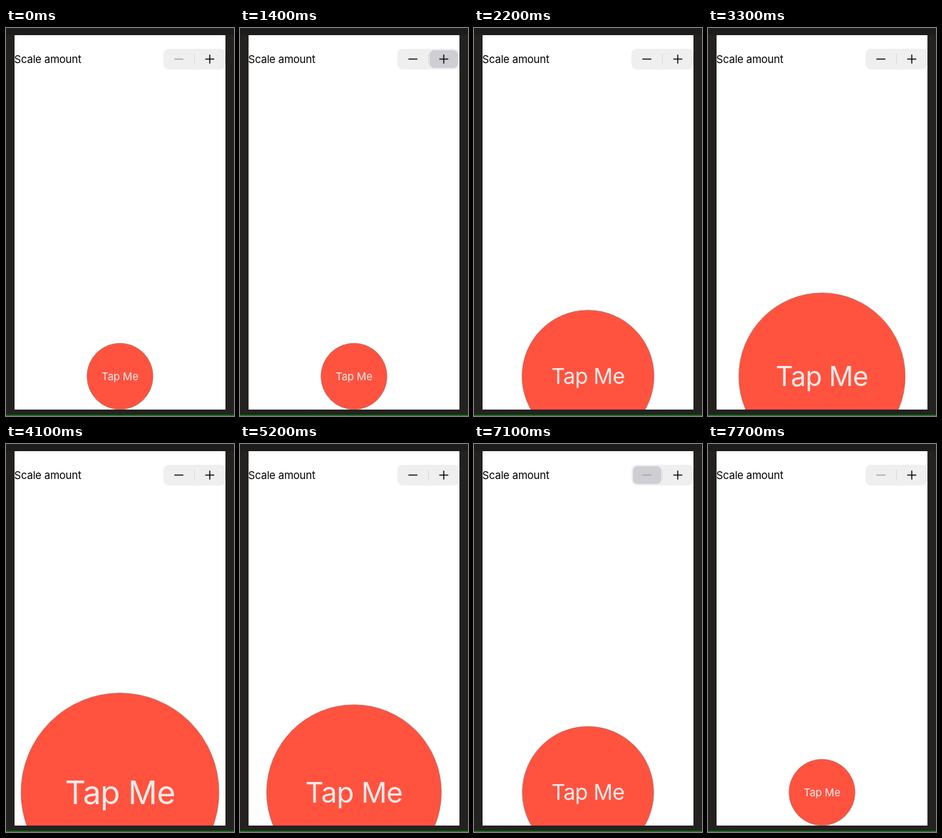
These frames come from a looping animation (320 by 543 pixels, 8 s). An HTML page:

```html
<!DOCTYPE html>
<html lang="en">
<head>
<meta charset="utf-8">
<title>Scale stepper</title>
<style>
  html, body { margin: 0; width: 100%; height: 100%; overflow: hidden; background: #242221; }
  svg { display: block; width: 100vw; height: 100vh; }
  text { font: 15px Inter, "Open Sans", sans-serif; letter-spacing: -0.2px; }
</style>
</head>
<body>
<svg viewBox="0 0 320 543">
  <clipPath id="screen"><rect x="12" y="10" width="296" height="524"/></clipPath>
  <rect width="320" height="543" fill="#242221"/>
  <rect width="320" height="10" fill="#1e1c1b"/>
  <rect y="541.5" width="320" height="1.5" fill="#187d1c"/>
  <g clip-path="url(#screen)">
    <rect x="12" y="10" width="296" height="524" fill="#fff"/>
    <text x="11.5" y="48.8">Scale amount</text>

    <rect x="221" y="29" width="87" height="29" rx="7.5" fill="#efeff0"/>
    <path d="M264.5 36V51" stroke="#dcdcde"/>
    <rect id="press" y="31" width="40" height="25" rx="6.5" fill="#cfced4"/>
    <path id="minus" d="M236.3 43.5h12.6" stroke-width="1.5"/>
    <path d="M279.7 43.5h12.6M286 37.2v12.6" stroke="#111" stroke-width="1.5"/>

    <circle id="disc" cx="160" cy="487.5" fill="#ff5340" stroke="#b0655c" stroke-width="0.7"/>
    <g id="label"><text y="5.4" text-anchor="middle" fill="#f7ebe9">Tap Me</text></g>
  </g>
</svg>
<script>
  const LOOP = 8000, STEP = 100, DURATION = 350, HOLD = 200, RADIUS = 46.3;
  const taps = [
    { at: 1400, delay: 20, change: 1 },
    { at: 3100, delay: 20, change: 1 },
    { at: 5000, delay: 60, change: -1 },
    { at: 7100, delay: -20, change: -1 },
  ];
  const [press, minus, disc, label] =
    ["press", "minus", "disc", "label"].map(id => document.getElementById(id));

  function ease(p) {
    p = Math.min(1, Math.max(0, p));
    return p * p * (3 - 2 * p);
  }

  function draw() {
    const t = Math.floor(performance.now() % LOOP / STEP) * STEP;
    let scale = 1, value = 1, held = null;
    for (const tap of taps) {
      scale += tap.change * ease((t - tap.at - tap.delay) / DURATION);
      if (t >= tap.at) value += tap.change;
      if (t >= tap.at && t < tap.at + HOLD) held = tap;
    }
    press.setAttribute("visibility", held ? "visible" : "hidden");
    press.setAttribute("x", held && held.change < 0 ? 223 : 266);
    minus.setAttribute("stroke", value > 1 ? "#111" : "#a3a3a5");
    disc.setAttribute("r", RADIUS * scale);
    label.setAttribute("transform", `translate(160 487.5) scale(${scale})`);
    requestAnimationFrame(draw);
  }
  draw();
</script>
</body>
</html>
```
